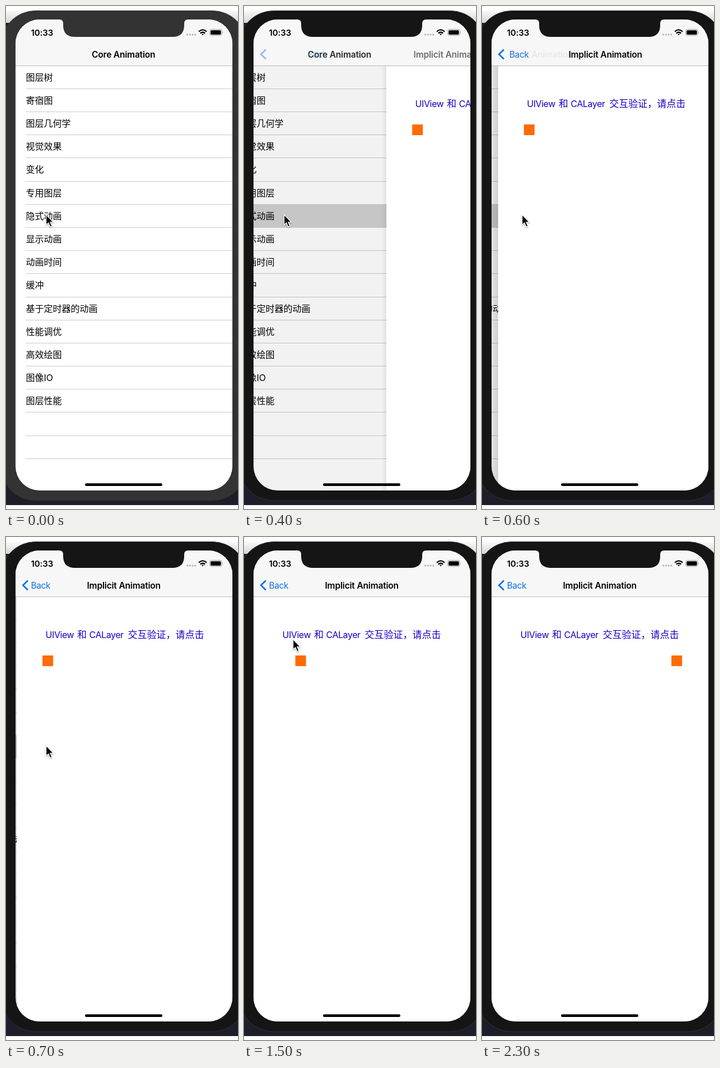
Animation, 414 px wide and 896 px high, one loop 2400 ms. Source, as an HTML page:

```html
<!DOCTYPE html>
<html lang="zh-CN">
<head>
<meta charset="utf-8">
<title>Core Animation</title>
<style>
  html, body { margin: 0; width: 414px; height: 896px; overflow: hidden; background: #fff; }
  svg { display: block; }
  text { font-family: Inter, "Noto Sans CJK SC", "Noto Sans CJK", sans-serif; font-size: 16px; }
  .title { font-size: 15.5px; font-weight: 600; letter-spacing: -.18px; }
  .back { font-size: 15.5px; letter-spacing: -.4px; fill: #0f73e6; }
  .clock { font-size: 15px; font-weight: 600; letter-spacing: -.1px; }
  .label { font-size: 17px; fill: #1600c8; }
  .latin { font-size: 16px; letter-spacing: -.45px; }
</style>
</head>
<body>
<svg width="414" height="896" viewBox="0 0 414 896">
  <defs>
    <linearGradient id="sky" x2="0" y2="1">
      <stop offset="0" stop-color="#fafafa"/><stop offset="1" stop-color="#d6d6d6"/>
    </linearGradient>
    <linearGradient id="edge">
      <stop offset="0" stop-opacity="0"/><stop offset="1" stop-opacity=".07"/>
    </linearGradient>
    <clipPath id="screen"><rect x="17" y="24" width="387" height="839" rx="43"/></clipPath>
    <clipPath id="content"><rect x="17" y="106" width="387" height="757"/></clipPath>
  </defs>

  <rect y="8" width="414" height="22" fill="url(#sky)"/>
  <rect y="30" width="414" height="859" fill="#1d1e29"/>
  <rect id="body" x="-9" y="8.5" width="439" height="872.5" rx="62" stroke="#303032"/>

  <g clip-path="url(#screen)">
    <rect x="17" y="24" width="387" height="839" fill="#fff"/>
    <g clip-path="url(#content)">
      <g id="list"></g>
      <rect id="dim" x="17" y="106" width="387" height="757"/>
      <g id="page">
        <rect x="8" y="106" width="9" height="757" fill="url(#edge)"/>
        <rect x="17" y="106" width="387" height="757" fill="#fff"/>
        <text class="label" y="179.5"><tspan class="latin" x="68.5">UIView</tspan><tspan x="125">和</tspan><tspan class="latin" x="146.5">CALayer</tspan><tspan x="215.5">交互验证，请点击</tspan></text>
        <rect id="box" y="211" width="19" height="19" fill="#ff6b05"/>
      </g>
    </g>

    <rect x="17" y="24" width="387" height="82" fill="#f7f7f7"/>
    <path d="M17 106.5H404" stroke="#b9b9b9"/>
    <text id="oldTitle" class="title" x="153" y="91.5">Core Animation</text>
    <text id="newTitle" class="title" x="210.2" y="91.5" text-anchor="middle">Implicit Animation</text>
    <path id="chevron" d="M39 77.5L30.3 86L39 94.5" fill="none" stroke="#0f73e6" stroke-width="2.8"/>
    <text id="back" class="back" x="44.5" y="91.5">Back</text>

    <text class="clock" x="44.5" y="52.5">10:33</text>
    <g fill="#bcbcbc">
      <circle cx="323.5" cy="51" r="1.8"/><circle cx="328.3" cy="51" r="1.8"/>
      <circle cx="333" cy="51" r="1.8"/><circle cx="337.7" cy="51" r="1.8"/>
    </g>
    <g fill="none" stroke="#000" stroke-width="2.3">
      <path d="M344 45.6Q351 39.2 358 45.6"/>
      <path d="M346.7 48.6Q351 44.8 355.3 48.6"/>
      <path d="M349 50.2Q351 48.6 353 50.2L351 52.3Z" fill="#000" stroke="none"/>
    </g>
    <rect x="363.5" y="41.7" width="21.5" height="10.8" rx="3" fill="none" stroke="#999"/>
    <rect x="365" y="43.2" width="18.5" height="7.8" rx="1.8"/>
    <path d="M386.3 45.2q1.6 1.9 0 3.8z" fill="#999"/>
    <rect x="141" y="850.3" width="138" height="4.8" rx="2.4"/>
  </g>
  <path id="notch" d="M95 23H325V24Q318 24 318 31V34Q318 55 297 55H123Q102 55 102 34V31Q102 24 95 24Z"/>

  <path id="cursor" d="M0 0V18.5L4.2 14.8L7.4 22L10.6 20.6L7.5 13.6H13Z" stroke="#fff" stroke-width="1.4" style="filter: drop-shadow(0 1px 1px #0006)"/>
</svg>
<script>
const LOOP = 2400, STEP = 100, ROW = 41.17, TOP = 106.3, SELECTED = 6;
const $ = id => document.getElementById(id);
const rows = ['图层树', '寄宿图', '图层几何学', '视觉效果', '变化', '专用图层', '隐式动画', '显示动画',
  '动画时间', '缓冲', '基于定时器的动画', '性能调优', '高效绘图', '图像IO', '图层性能', '', ''];

$('list').innerHTML =
  `<rect id="mark" x="17" y="${TOP + SELECTED * ROW}" width="500" height="${ROW}" fill="#d1d1d1"/>` +
  rows.map((name, i) => {
    const y = TOP + i * ROW;
    return `<text x="35.5" y="${y + 26.5}">${name}</text>` +
      `<path d="M35.5 ${Math.floor(y + ROW) + .5}H520" stroke="#c9c9c9"/>`;
  }).join('');

// time, x, y of the pointer tip
const pointer = [[0, 71.5, 371.5], [700, 71.5, 371.5], [1100, 86.5, 164], [1300, 86.5, 164],
  [1500, 87.5, 182], [1900, 87.5, 182], [2100, 60, 182]];
const HIDE = 2200;

const clamp = v => Math.min(1, Math.max(0, v));
const ease = v => v * v * (3 - 2 * v);
const shift = (id, x, y = 0) => $(id).setAttribute('transform', `translate(${x} ${y})`);
const alpha = (id, v) => $(id).setAttribute('opacity', v);

// share of the push still to go, as a critically damped spring
function remaining(t) {
  const u = Math.max(0, t - 333) * .02;
  return (1 + u) * Math.exp(-u);
}

function pointerAt(t) {
  const i = pointer.findLastIndex(k => k[0] <= t);
  const a = pointer[i], b = pointer[i + 1] || a;
  const p = b === a ? 0 : ease((t - a[0]) / (b[0] - a[0]));
  return [a[1] + (b[1] - a[1]) * p, a[2] + (b[2] - a[2]) * p];
}

function draw(t) {
  const left = remaining(t), done = 1 - left, bar = left ** .92;
  const shell = t < 200 ? '#333' : '#151515';
  $('body').setAttribute('fill', shell);
  $('notch').setAttribute('fill', shell);

  shift('list', -.3 * 387 * done);
  alpha('mark', t > 333 ? 1 : 0);
  alpha('dim', .13 * done);
  shift('page', 387 * left);
  alpha('page', left < 1 ? 1 : 0);

  shift('oldTitle', -108 * (1 - bar));
  alpha('oldTitle', t >= 700 ? 0 : clamp(bar * 1.3));
  shift('newTitle', t >= 700 ? 0 : 248 * bar);
  alpha('newTitle', t >= 700 ? 1 : clamp(1 - bar * .7) * (left < 1));
  shift('back', t >= 700 ? 0 : 108 * bar);
  alpha('back', t >= 700 ? 1 : clamp(1 - bar * 1.1));
  alpha('chevron', clamp(done * 1.15));

  $('box').setAttribute('x', 63 + 275 * ease(clamp((t - 1400) / 500)));
  shift('cursor', ...pointerAt(t));
  alpha('cursor', t < HIDE ? 1 : 0);
}

const start = performance.now();
function tick() {
  const t = (performance.now() - start) % LOOP;
  draw(Math.floor(t / STEP) * STEP);
  requestAnimationFrame(tick);
}
tick();
</script>
</body>
</html>
```
